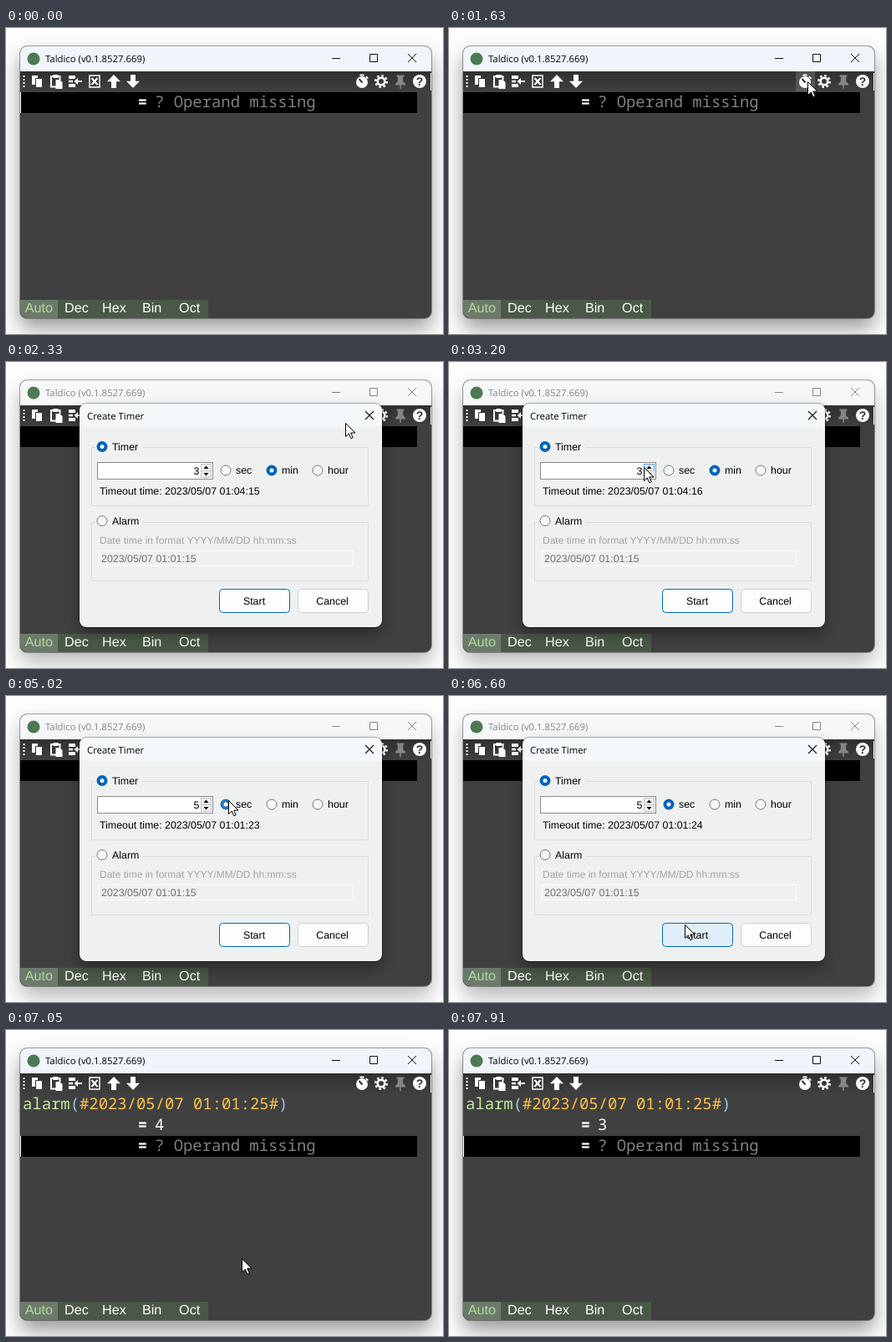
Write an HTML page that moves like this. It is 523 px wide and 367 px high and loops after 8000 ms.

```html
<!DOCTYPE html>
<html lang="en">
<head>
<meta charset="utf-8">
<title>Timer dialog</title>
<style>
html, body { margin: 0; width: 100%; height: 100%; overflow: hidden; background: #fdfdfd; }
svg { display: block; width: 523px; height: 367px; text-rendering: geometricPrecision; }
.ui { font: 11.35px "Open Sans", "Noto Sans", sans-serif; }
.form { font: 12.4px "Liberation Sans", sans-serif; }
.tab { font: 16.2px "Liberation Sans", sans-serif; }
.code { font: 18.9px "Noto Sans Mono", monospace; }
.mid { text-anchor: middle; }
.line { fill: none; }
</style>
</head>
<body>
<svg viewBox="0 0 523 367">
  <defs>
    <filter id="blur" x="-20%" y="-20%" width="140%" height="140%"><feGaussianBlur stdDeviation="9"/></filter>
    <filter id="wideBlur" x="-20%" y="-20%" width="140%" height="140%"><feGaussianBlur stdDeviation="12"/></filter>
    <clipPath id="winClip"><rect x="17" y="22" width="492" height="326" rx="8"/></clipPath>
    <clipPath id="dlgClip"><rect x="88" y="50" width="362" height="268" rx="8"/></clipPath>
    <linearGradient id="bar" x2="0" y2="1"><stop stop-color="#303030"/><stop offset="1" stop-color="#404040"/></linearGradient>
  </defs>
  <rect width="523" height="367" fill="#fdfdfd"/>
  <rect id="winShadow" x="17" y="34" width="492" height="326" rx="8" filter="url(#wideBlur)"/>

  <g clip-path="url(#winClip)">
    <rect x="17" y="22" width="492" height="326" fill="#404040"/>
    <rect id="titleBar" x="17" y="22" width="492" height="30"/>
    <circle cx="33" cy="37" r="7.5" fill="#4c7a52"/>
    <text id="title" class="ui" x="47" y="41">Taldico (v0.1.8527.669)</text>
    <path id="winButtons" class="line" d="M390 36.5h10M435.5 31.5h9v9h-9zM481 31l10 10m0-10l-10 10"/>

    <rect x="17" y="52" width="492" height="25" fill="url(#bar)"/>
    <rect id="timerHover" x="415" y="52" width="23" height="24" fill="#fff" fill-opacity=".15"/>
    <g fill="#fff">
      <path d="M21.5 57v16" stroke="#fff" stroke-width="2" stroke-dasharray="2 2"/>
      <path d="M31 57h7v11h-7z"/>
      <path d="M35.5 60.5h8v11h-8z" stroke="#333"/>
      <path class="line" d="M60 70.5h-6V58h10.5v4" stroke="#fff" stroke-width="2"/>
      <path d="M56.5 56h6v4h-6zM59.5 62h5l3 3v8h-8z"/>
      <path d="M75 57h8v4h-8zM75 67h8v4h-8zM75 62.8h5v2.4h-5zM81.500 64l4.500-4v3h5v2h-5v3z"/>
      <path class="line" d="M100 57h12v14h-12z" stroke="#fff" stroke-width="1.500"/>
      <path class="line" d="M102.500 60l7 8m0-8l-7 8" stroke="#fff" stroke-width="2.200"/>
      <path d="M129 56l8 8.200h-5V72h-6v-7.800h-5z"/>
      <path d="M152 72l8-8.200h-5V56h-6v7.800h-5z"/>
      <path d="M423.500 55.500h5v2h-5zM431.500 57.500l2.500 2.500-1.300 1.300-2.500-2.500z"/>
      <circle cx="426" cy="65" r="7"/>
      <path d="M422.500 61l4 4.500" stroke="#333" stroke-width="2"/>
      <circle class="line" cx="449" cy="64" r="4.300" stroke="#fff" stroke-width="2.600"/>
      <circle class="line" cx="449" cy="64" r="6.700" stroke="#fff" stroke-width="2.600" stroke-dasharray="2.600 2.662"/>
      <path d="M467.500 56.500h9v2h-1.300v5.500l2.800 3v1.500h-5.200V73h-1.600v-4.500H466V67l2.800-3v-5.500h-1.300z" fill="#858585"/>
      <circle cx="495" cy="64" r="8"/>
      <text x="495" y="69" class="mid" font-family="Liberation Sans, sans-serif" font-size="14" font-weight="700" fill="#333">?</text>
      <path d="M508 54h1v21h-1z"/>
    </g>

    <g id="history" class="code">
      <text x="20" y="95" fill="#c6eba2">alarm<tspan fill="#9ccbe8">(</tspan><tspan fill="#ffc34a">#2023/05/07 01:01:25#</tspan><tspan fill="#9ccbe8">)</tspan></text>
      <text x="157.7" y="120" fill="#fff" font-weight="700">=</text>
      <text id="result" x="178" y="120" fill="#fff"></text>
    </g>
    <g id="entry">
      <rect x="17" y="77" width="475" height="25"/>
      <g id="prompt" class="code">
        <text x="157.7" y="95" fill="#fff" font-weight="700">=</text>
        <text x="178" y="95" fill="#808080">? Operand missing</text>
      </g>
      <rect id="caret" x="17" y="77" width="1" height="25" fill="#fff"/>
    </g>

    <rect x="17" y="326" width="225" height="22" fill="#4a5947"/>
    <rect x="17" y="326" width="45" height="22" fill="#6b7a6b"/>
    <g id="tabs" class="tab mid" fill="#fff"></g>
  </g>
  <rect x="16.5" y="21.5" width="493" height="327" rx="8.5" class="line" stroke="#000" stroke-opacity=".35"/>

  <g id="dialog">
    <rect x="88" y="58" width="362" height="268" rx="8" filter="url(#blur)" opacity=".35"/>
    <g clip-path="url(#dlgClip)">
      <rect x="88" y="50" width="362" height="268" fill="#eff1f1"/>
      <rect x="88" y="50" width="362" height="28" fill="#f5f8fb"/>
      <rect id="closeHover" x="419" y="50" width="31" height="28.5" fill="#c42b1c"/>
    </g>
    <rect x="87.5" y="49.5" width="363" height="269" rx="8.5" class="line" stroke="#000" stroke-opacity=".3"/>
    <text class="ui" x="97" y="68.5">Create Timer</text>
    <path id="closeX" class="line" d="M430 59l10 10m0-10l-10 10" stroke-width="1.1"/>
    <path class="line" d="M102.5 102.5h331v70h-331zM102.5 192.5h331v70h-331z" stroke="#dcdcdc"/>
    <path d="M107 95h56v14h-56zM107 184h56v14h-56z" fill="#eff1f1"/>

    <rect x="109.5" y="120.5" width="138" height="20" fill="#fff" stroke="#8a8a8a"/>
    <rect id="spinUp" x="233.5" y="122.5" width="12" height="8"/>
    <rect x="233.5" y="130.5" width="12" height="8" fill="#f0f0f0" stroke="#c4c4c4"/>
    <path d="M236.5 128l3-3.5 3 3.5zM236.5 133l3 3.5 3-3.5z"/>

    <g id="radios"></g>
    <g class="form">
      <text x="127" y="106">Timer</text>
      <text x="127" y="195">Alarm</text>
      <text x="275" y="134">sec</text>
      <text x="330" y="134">min</text>
      <text x="385" y="134">hour</text>
      <text id="amount" x="231.5" y="134.5" text-anchor="end"></text>
      <text id="timeout" x="112" y="159"></text>
      <text x="112" y="218" font-size="12" fill="#a3a3a3">Date time in format YYYY/MM/DD hh:mm:ss</text>
      <rect x="111.5" y="226.5" width="304" height="18" class="line" stroke="#fbfbfb"/>
      <text x="114" y="240" fill="#6d6d6d">2023/05/07 01:01:15</text>
      <rect id="start" x="255.5" y="272.5" width="84" height="28" rx="4" stroke="#0067c0"/>
      <rect x="349.5" y="272.5" width="84" height="28" rx="4" fill="#fdfdfd" stroke="#d0d0d0"/>
      <text class="mid" x="297" y="291">Start</text>
      <text class="mid" x="390.5" y="291">Cancel</text>
    </g>
  </g>

  <path id="cursor" d="M.5 .5V16.5L4.300 13l2.500 5.700 2.400-1L6.700 12H12z" fill="#fff" stroke="#000" stroke-linejoin="round"/>
</svg>
<script>
const LOOP = 8000, OPEN = 1780, CLOSE = 6870, FADE = 150;
const TICKS = [2600, 3610, 4640, 5670, 6700];
const PATH = [
  [960, 501, 138], [1680, 428, 63], [2180, 428, 63], [2800, 278, 127],
  [3000, 278, 127], [3200, 233, 126], [4400, 233, 126], [4870, 266, 125],
  [5630, 266, 125], [6400, 281, 271], [6450, 282, 274], [7100, 282, 274], [7360, 476, 292]
];
const RADIOS = [[115, 101.5], [115, 190.5], [263, 130], [318, 130], [373, 130]];

const el = id => document.getElementById(id);
const set = (id, attrs) => { for (const k in attrs) el(id).setAttribute(k, attrs[k]); };
const show = (id, on) => set(id, { visibility: on ? 'visible' : 'hidden' });
const write = (id, s) => { el(id).textContent = s; };
const clamp = v => Math.min(1, Math.max(0, v));
const within = (t, a, b) => t >= a && t < b;
const two = n => String(n).padStart(2, '0');

el('tabs').innerHTML = ['Auto', 'Dec', 'Hex', 'Bin', 'Oct'].map((s, i) =>
  `<text x="${39.3 + i * 45.1}" y="341"${i ? '' : ' fill="#b6d89c"'}>${s}</text>`).join('');
el('radios').innerHTML = RADIOS.map(([x, y], i) =>
  `<circle id="radio${i}" cx="${x}" cy="${y}"/>`).join('');

function cursorAt(t) {
  let i = 1;
  while (i < PATH.length - 1 && t > PATH[i][0]) i++;
  const [t0, x0, y0] = PATH[i - 1], [t1, x1, y1] = PATH[i];
  const p = clamp((t - t0) / (t1 - t0)), e = p * p * (3 - 2 * p);
  return [x0 + (x1 - x0) * e, y0 + (y1 - y0) * e];
}

function timeoutText(t, amount, seconds) {
  const now = 61 * 60 + 15 + TICKS.filter(k => t >= k).length;
  const end = now + amount * (seconds ? 1 : 60);
  return `Timeout time: 2023/05/07 ${two(Math.floor(end / 3600))}:${two(Math.floor(end / 60) % 60)}:${two(end % 60)}`;
}

function drawWindow(t) {
  const active = !within(t, OPEN, CLOSE), done = t >= CLOSE;
  set('winShadow', { opacity: active ? 0.4 : 0.28 });
  set('titleBar', { fill: active ? '#eff5fa' : '#f5f7f9' });
  set('title', { fill: active ? '#000' : '#858585' });
  set('winButtons', { stroke: active ? '#111' : '#858585' });
  show('timerHover', within(t, 1500, OPEN));
  show('history', done);
  write('result', t < 7910 ? '4' : '3');
  set('entry', { transform: `translate(0 ${done ? 50 : 0})` });
  show('prompt', active);
  show('caret', t < 500 || within(t, 1030, 1560) || within(t, CLOSE, 7380) || t >= 7910);
}

function drawDialog(t, x, y) {
  const open = clamp((t - OPEN) / 250), close = clamp((t - CLOSE) / FADE);
  const scale = 1 - 0.12 * (1 - open) ** 3 - 0.052 * close;
  const alpha = clamp((t - OPEN + 20) / 90) * (1 - close);
  show('dialog', within(t, OPEN, CLOSE + FADE));
  set('dialog', { opacity: alpha, transform: `translate(215 168) scale(${scale}) translate(-215 -168)` });

  const overClose = x > 418 && y < 79;
  show('closeHover', overClose && within(t, OPEN, 2800));
  set('closeX', { stroke: overClose ? '#fff' : '#111' });

  const seconds = t >= 5020, amount = t < 3560 ? 3 : t < 4150 ? 4 : 5;
  write('amount', amount);
  write('timeout', timeoutText(t, amount, seconds));

  const overSpin = y > 121 && y < 131 && x >= 232 && x < 246;
  const pressed = within(t, 3560, 3700) || within(t, 4150, 4270);
  set('spinUp', {
    fill: pressed ? '#cce4f7' : overSpin ? '#e0eef9' : '#f0f0f0',
    stroke: overSpin ? '#5f9fd6' : '#c4c4c4'
  });

  RADIOS.forEach(([cx, cy], i) => {
    const on = i === 0 || i === (seconds ? 2 : 3);
    const hot = Math.hypot(x - cx, y - cy) < 8;
    set('radio' + i, on
      ? { r: 4.5, fill: '#fff', stroke: hot ? '#2a78b8' : '#0063b8', 'stroke-width': 4 }
      : { r: 6, fill: hot ? '#e6e8e8' : '#f7f7f7', stroke: '#777', 'stroke-width': 1 });
  });

  const hover = clamp((t - 6420) / 100);
  const mix = (a, b) => Math.round(a + (b - a) * hover);
  set('start', { fill: `rgb(${mix(253, 224)},${mix(253, 238)},${mix(253, 249)})` });
}

function draw(t) {
  const [x, y] = cursorAt(t);
  drawWindow(t);
  drawDialog(t, x, y);
  show('cursor', within(t, 960, 7410));
  set('cursor', { transform: `translate(${Math.round(x)} ${Math.round(y)})` });
}

const began = performance.now();
function loop() {
  draw((performance.now() - began) % LOOP);
  requestAnimationFrame(loop);
}
loop();
</script>
</body>
</html>
```
